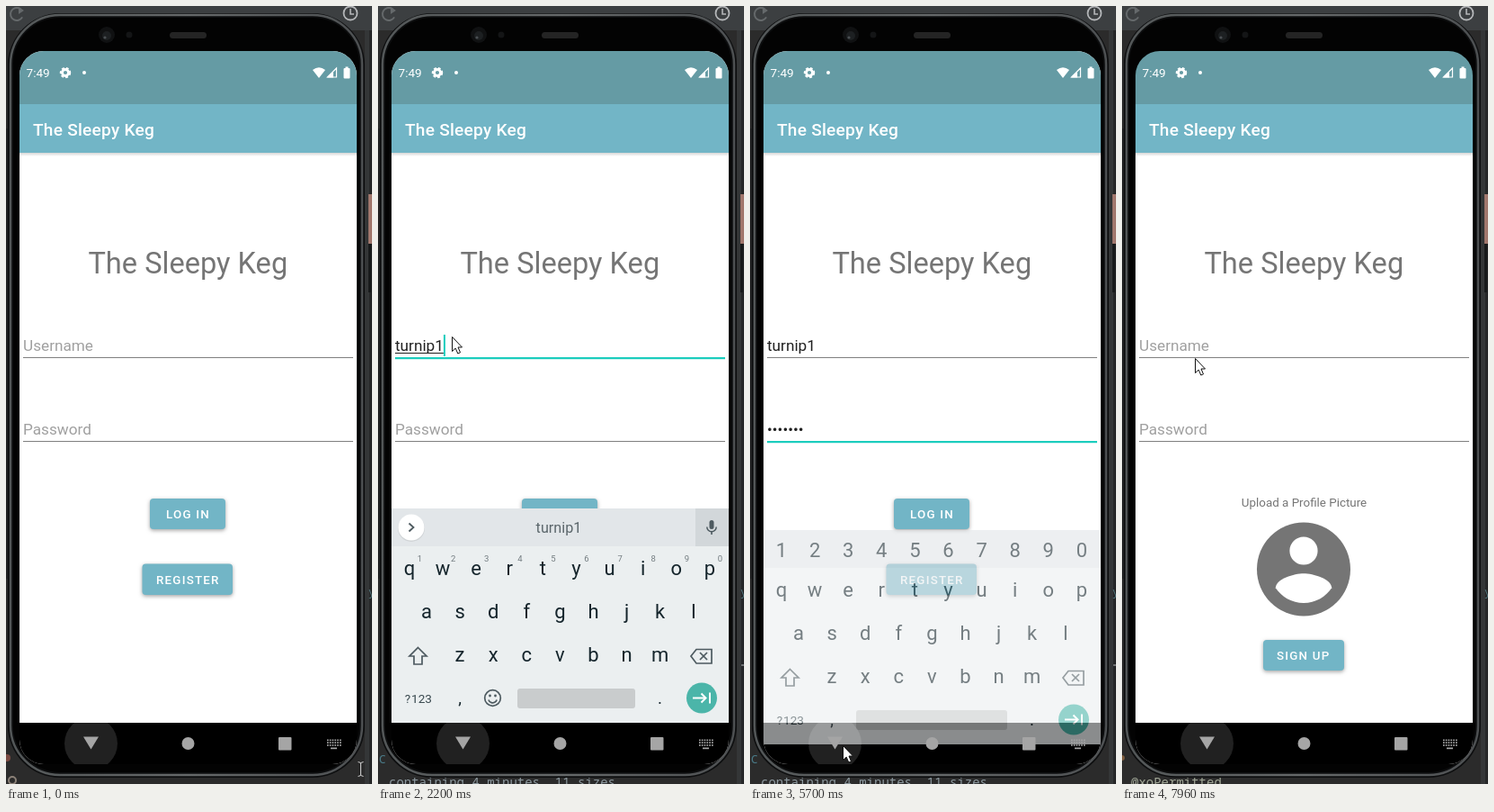
Animation, 407 px wide and 864 px high, one loop 8000 ms. Source, as an HTML page with a canvas:

```html
<!DOCTYPE html>
<html lang="en">
<head>
<meta charset="utf-8">
<title>Login screen</title>
<style>
html, body { margin: 0; width: 100%; height: 100%; overflow: hidden; background: #2b2b2b; }
canvas { display: block; }
</style>
</head>
<body>
<canvas id="stage" width="407" height="864"></canvas>
<script>
const stage = document.getElementById('stage').getContext('2d');
const layer = document.createElement('canvas').getContext('2d');
layer.canvas.width = 407;
layer.canvas.height = 864;
let ctx = stage;

const LOOP = 8000;
const APP = 'The Sleepy Keg';
const WORD = 'turnip1';
const SANS = 'Roboto, sans-serif';
const MONO = 'Noto Sans Mono, monospace';
const TEAL = '#72b5c6', ACCENT = '#1bcdbd', INK = '#15252c', ICON = '#4d5a60';
const USER_KEYS = [1390, 1480, 1580, 1720, 1860, 1930, 2200];
const PASS_KEYS = [3340, 3430, 3530, 3730, 3830, 3920, 4280];
const HINTS = [['to', 'the'], ['tux', 'tuesday'], ['tour', 'turkey'], ['turns', 'turned'], ['turning', 'turnips'], ['turnips', 'turning']];
// time, x, y of the pointer tip
const POINTER = [
  [70, 394, 847], [620, 82, 367], [4719, 82, 367], [4720, 151, 337], [5050, 168, 745],
  [5180, 168, 745], [5460, 103, 821], [5720, 103, 821], [6030, 150, 641], [6100, 152, 641],
  [6770, 208, 632], [7440, 208, 632], [7930, 81, 391]
];
const CLICKS = [[650, 770], [5490, 5600], [7170, 7290]];

const clamp = v => Math.max(0, Math.min(1, v));
const span = (t, a, b) => clamp((t - a) / (b - a));
const within = (t, a, b) => t >= a && t < b;
const count = (keys, t) => keys.filter(k => t >= k).length;

function rect(x, y, w, h, color) {
  ctx.fillStyle = color;
  ctx.fillRect(x, y, w, h);
}
function round(x, y, w, h, r, color) {
  ctx.beginPath();
  ctx.roundRect(x, y, w, h, r);
  ctx.fillStyle = color;
  ctx.fill();
}
function disc(x, y, r, color) {
  ctx.beginPath();
  ctx.arc(x, y, r, 0, Math.PI * 2);
  ctx.fillStyle = color;
  ctx.fill();
}
function trace(pts, close) {
  ctx.beginPath();
  for (let i = 0; i < pts.length; i += 2) ctx.lineTo(pts[i], pts[i + 1]);
  if (close) ctx.closePath();
}
function poly(pts, color) {
  trace(pts, true);
  ctx.fillStyle = color;
  ctx.fill();
}
function line(pts, color, width = 1.6, close = false) {
  trace(pts, close);
  ctx.strokeStyle = color;
  ctx.lineWidth = width;
  ctx.stroke();
}
function ring(x, y, r, color, width, a = 0, b = Math.PI * 2) {
  ctx.beginPath();
  ctx.arc(x, y, r, a, b);
  ctx.strokeStyle = color;
  ctx.lineWidth = width;
  ctx.stroke();
}
function text(str, x, y, size, color, { align = 'left', weight = 400, gap = 0, family = SANS } = {}) {
  ctx.font = `${weight} ${size}px ${family}`;
  ctx.letterSpacing = gap + 'px';
  ctx.textAlign = align;
  ctx.fillStyle = color;
  ctx.fillText(str, x, y);
  return ctx.measureText(str).width;
}
// Flattens a drawing so that it can fade or scale as one picture.
function flatten(draw) {
  ctx = layer;
  ctx.clearRect(0, 0, 407, 864);
  draw();
  ctx = stage;
}

function drawDesk(t) {
  rect(0, 0, 407, 864, '#2b2b2b');
  rect(0, 0, 407, 27, '#3c3f41');
  ring(12, 9, 7, '#65696b', 2, 0.5, 5.4);
  poly([14, 1, 20, 5, 14, 9], '#65696b');
  ring(383, 8, 7.5, '#b4b6b8', 1.8);
  line([383, 3, 383, 9, 387, 9], '#b4b6b8', 1.6);
  rect(0, 136, 2, 500, '#222324');
  rect(399, 27, 5, 837, '#343637');
  rect(404, 27, 3, 837, '#252627');
  rect(403, 209, 4, 55, '#a1776d');
  rect(403, 264, 3, 54, '#17191a');
  const code = { family: MONO };
  text('y', 403, 655, 12, '#51767c', code);
  if (t < 990) {
    disc(1, 835, 4, '#7a4a42');
    ring(7, 860, 4, '#8b8178', 2);
  } else if (t < 7500) {
    rect(404, 731, 3, 2, '#707273');
    text('C', 1, 841, 13, '#4b7d8b', code);
    text('containing 4 minutes, 11 sizes', 12, 867, 14, '#8d999f', code);
  } else {
    disc(0, 835, 3, '#7d5c3d');
    text('@xoPermitted', 10, 867, 14, '#a0a696', code);
  }
}

function drawPhone() {
  const edge = ctx.createLinearGradient(0, 0, 407, 0);
  edge.addColorStop(0, '#525657');
  edge.addColorStop(0.5, '#66696a');
  edge.addColorStop(1, '#4b4e50');
  round(2, 8, 397, 849, 58, '#0d0e0f');
  ctx.beginPath();
  ctx.roundRect(5, 10, 391, 844, 55);
  ctx.strokeStyle = edge;
  ctx.lineWidth = 2.5;
  ctx.stroke();
  round(8, 13, 385, 838, 52, '#030303');
  disc(112, 32, 9, '#101112');
  disc(112, 33, 5, '#1d2022');
  disc(110, 35, 1.6, '#4a4f52');
  disc(137, 32, 3.5, '#141516');
  round(182, 29, 41, 7, 3.5, '#242424');
}

function drawButton(label, x, y, w, h, tx) {
  ctx.save();
  ctx.shadowColor = 'rgba(0,0,0,.36)';
  ctx.shadowBlur = 4;
  ctx.shadowOffsetY = 1.6;
  round(x, y, w, h, 4, TEAL);
  ctx.restore();
  text(label, tx, y + h / 2 + 5, 13.4, '#fff', { weight: 500, gap: 1.2 });
}

function drawField(hint, base, value, { focus, caret, composing } = {}) {
  if (focus) rect(19, base + 7, 367, 2.2, ACCENT);
  else rect(19, base + 7, 367, 1, '#808080');
  let w = 0;
  if (value) w = text(value, 19, base, 17.2, '#202020');
  else text(hint, 19, base, 17.2, '#a0a0a0');
  if (composing && value) rect(19, base + 2, w, 1, '#202020');
  if (caret) rect(19 + w, base - 18, 2, 24, ACCENT);
}

function drawHeader() {
  rect(15, 50, 375, 792, '#fff');
  const shade = ctx.createLinearGradient(0, 163, 0, 167);
  shade.addColorStop(0, 'rgba(0,0,0,.16)');
  shade.addColorStop(1, 'rgba(0,0,0,0)');
  rect(15, 163, 375, 4, shade);
  rect(15, 50, 375, 59, '#659ba4');
  rect(15, 109, 375, 54, TEAL);
  text(APP, 30, 144, 19.1, '#fff', { weight: 500, gap: 0.24 });
  text(APP, 202.3, 297, 32.6, '#757575', { align: 'center' });
}

function passwordText(t) {
  const n = count(PASS_KEYS, t);
  if (!n) return '';
  return t < 5240 ? '•'.repeat(n - 1) + WORD[n - 1] : '•'.repeat(n);
}

function drawLogin(t) {
  drawHeader();
  const onUser = within(t, 720, 2530);
  const onPass = t >= 2530;
  const blink = within(t, 2530, 3070) || within(t, 3340, 4740) || within(t, 5240, 5690) || within(t, 6190, 6690);
  drawField('Username', 383, WORD.slice(0, count(USER_KEYS, t)), {
    focus: onUser, caret: onUser && t >= 990, composing: onUser
  });
  drawField('Password', 476, passwordText(t), { focus: onPass, caret: blink });
  drawButton('LOG IN', 160, 547, 84, 34, 178);
  drawButton('REGISTER', 151.5, 619.5, 100.5, 34.5, 167);
}

function drawRegister() {
  drawHeader();
  drawField('Username', 383, '');
  drawField('Password', 476, '');
  text('Upload a Profile Picture', 202.5, 556, 13.4, '#757575', { align: 'center' });
  disc(202, 625.5, 52, '#757575');
  disc(202, 605, 15.6, '#fff');
  ctx.beginPath();
  ctx.moveTo(170.8, 646.3);
  ctx.bezierCurveTo(171, 636, 191.6, 630.2, 202, 630.2);
  ctx.bezierCurveTo(212.4, 630.2, 233, 636, 233.2, 646.3);
  ctx.bezierCurveTo(226.5, 656.4, 215, 663, 202, 663);
  ctx.bezierCurveTo(189, 663, 177.5, 656.4, 170.8, 646.3);
  ctx.fillStyle = '#fff';
  ctx.fill();
  drawButton('SIGN UP', 157, 704, 90, 34, 172);
}

function drawStatus() {
  text('7:49', 22.5, 79, 13.6, '#fff');
  ctx.save();
  ctx.setLineDash([2.7, 2.06]);
  ring(66, 74, 5, '#fff', 2.4);
  ctx.restore();
  ring(66, 74, 3.5, '#fff', 2.8);
  disc(87, 74, 2, '#fff');
  ctx.beginPath();
  ctx.moveTo(348, 80);
  ctx.lineTo(341, 71);
  ctx.quadraticCurveTo(348, 65.5, 355, 71);
  ctx.closePath();
  ctx.fillStyle = '#fff';
  ctx.fill();
  line([357.5, 79, 367.5, 79, 367.5, 69], '#fff', 1.2, true);
  poly([357, 79.5, 364, 79.5, 364, 73], '#fff');
  round(375.5, 69, 7, 11.5, 1, '#fff');
  rect(377.5, 67.5, 3, 2, '#fff');
}

function drawStrip(t) {
  rect(15, 558, 375, 42, '#e2e6e9');
  rect(353, 558, 37, 42, '#d2d7da');
  disc(37, 580, 15, 'rgba(0,0,0,.08)');
  disc(37, 579, 14.5, '#fff');
  line([34.5, 574.5, 39.5, 579, 34.5, 583.5], ICON, 1.8);
  round(368.5, 571, 5, 10, 2.5, ICON);
  ring(371, 578.5, 5.2, ICON, 1.5, 0, Math.PI);
  rect(370.2, 583.5, 1.6, 3.5, ICON);
  const n = count(USER_KEYS, t);
  if (!n) return;
  const word = (str, x) => text(str, x, 585, 16.2, '#5b666b', { align: 'center' });
  word(WORD.slice(0, n), 201);
  if (n < WORD.length) {
    word(HINTS[n - 1][0], 103);
    word(HINTS[n - 1][1], 302);
    rect(152, 571, 1, 16, '#c6cbce');
    rect(251, 571, 1, 16, '#c6cbce');
  }
}

function drawKeys(t) {
  const numeric = t >= 2620;
  const row = (keys, x, y, size = 22, color = INK) =>
    [...keys].forEach((k, i) => text(k, x + i * 37.1, y, size, color, { align: 'center' }));
  rect(15, 558, 375, 238, '#ebeff0');
  if (numeric) {
    rect(15, 558, 375, 42, '#e0e4e7');
    row('1234567890', 35, 588);
  } else {
    drawStrip(t);
    row('1234567890', 46.5, 617, 9.5, '#737c80');
  }
  row('qwertyuiop', 35, 632);
  row('asdfghjkl', 54, 680);
  row('zxcvbnm', 91, 728);
  line([44.5, 712.5, 54, 722, 49, 722, 49, 731, 40, 731, 40, 722, 35, 722], ICON, 1.7, true);
  line([348, 722, 354, 714.5, 371, 714.5, 371, 730, 354, 730], ICON, 1.7, true);
  line([358, 718, 366, 726], ICON, 1.7);
  line([366, 718, 358, 726], ICON, 1.7);
  row('?', 33, 774, 13.6, '#37474d');
  text('123', 37, 774, 13.6, '#37474d');
  row(',', 91, 775, 19);
  row('.', 313.5, 775, 19);
  if (!numeric) {
    ring(127.5, 768.5, 8.8, ICON, 1.7);
    disc(124.5, 766, 1.4, ICON);
    disc(130.5, 766, 1.4, ICON);
    ring(127.5, 769, 4.8, ICON, 1.7, 0.3, Math.PI - 0.3);
  }
  const left = numeric ? 118 : 155;
  round(left, 758, 286 - left, 22, 3, '#c9cccd');
  disc(360, 768.5, 17, '#4bb5a9');
  line([350, 768.5, 364, 768.5], '#fff', 2);
  line([359.5, 763.5, 364.5, 768.5, 359.5, 773.5], '#fff', 2);
  line([369, 762.5, 369, 774.5], '#fff', 2);
}

function drawKeyboard(t) {
  if (!within(t, 990, 5800)) return;
  const rise = span(t, 990, 1250);
  const fall = span(t, 5600, 5800);
  const dy = 73 * (1 - rise) ** 2 + 95 * fall ** 2;
  flatten(() => drawKeys(t));
  ctx.globalAlpha = Math.min(0.5 + 0.5 * rise, 1 - fall ** 1.3);
  ctx.drawImage(layer.canvas, 0, Math.round(dy));
  ctx.globalAlpha = 1;
}

function drawNav() {
  const gray = '#a5a5a5';
  ctx.save();
  ctx.beginPath();
  ctx.rect(15, 796, 375, 46);
  ctx.clip();
  disc(94.5, 819, 29.5, 'rgba(255,255,255,.13)');
  ctx.restore();
  poly([86, 811.5, 103, 811.5, 94.5, 825.5], gray);
  disc(202.5, 819, 7, gray);
  round(303, 812, 14.5, 14.5, 1, gray);
  for (let i = 0; i < 6; i++) {
    for (let j = 0; j < 3; j++) rect(357 + i * 2.8, 814.5 + j * 2.8, 1.7, 1.7, gray);
  }
  rect(361, 823.5, 7, 1.7, gray);
}

function drawOpening(p) {
  const scale = 1 - 0.15 * (1 - p) ** 3;
  flatten(drawRegister);
  ctx.save();
  ctx.globalAlpha = clamp(p * 2.5);
  ctx.translate(202.5, 446);
  ctx.scale(scale, scale);
  ctx.translate(-202.5, -446);
  ctx.drawImage(layer.canvas, 15, 50, 375, 792, 15, 50, 375, 792);
  ctx.restore();
}

function drawScreen(t) {
  const open = span(t, 7330, 7620);
  ctx.save();
  ctx.beginPath();
  ctx.roundRect(15, 50, 375, 792, 27);
  ctx.clip();
  if (open < 1) drawLogin(t);
  if (open > 0) drawOpening(open);
  rect(15, 796, 375, 46, '#000');
  drawKeyboard(t);
  drawStatus();
  drawNav();
  ctx.restore();
}

function pointerAt(t) {
  const i = POINTER.findIndex(p => p[0] > t);
  if (i <= 0) return POINTER.at(i).slice(1);
  const [a, x0, y0] = POINTER[i - 1], [b, x1, y1] = POINTER[i];
  const p = span(t, a, b), e = p * p * (3 - 2 * p);
  return [x0 + (x1 - x0) * e, y0 + (y1 - y0) * e];
}

function drawPointer(t) {
  const [x, y] = pointerAt(t);
  if (CLICKS.some(c => within(t, ...c))) disc(x, y + 1, 12, 'rgba(222,226,30,.68)');
  ctx.save();
  ctx.translate(Math.round(x) + 0.5, Math.round(y) + 0.5);
  if (x > 390) {
    line([-3, -8, 0, -7, 3, -8], '#d0d0d0', 1);
    line([0, -7, 0, 7], '#d0d0d0', 1);
    line([-3, 8, 0, 7, 3, 8], '#d0d0d0', 1);
  } else {
    const arrow = [0, 0, 0, 16, 3.7, 12.6, 6.3, 18.5, 9, 17.3, 6.5, 11.5, 11, 11.5];
    poly(arrow, '#fff');
    line(arrow, '#111', 1, true);
  }
  ctx.restore();
}

function frame() {
  const t = performance.now() % LOOP;
  drawDesk(t);
  drawPhone();
  drawScreen(t);
  drawPointer(t);
  requestAnimationFrame(frame);
}
frame();
</script>
</body>
</html>
```
